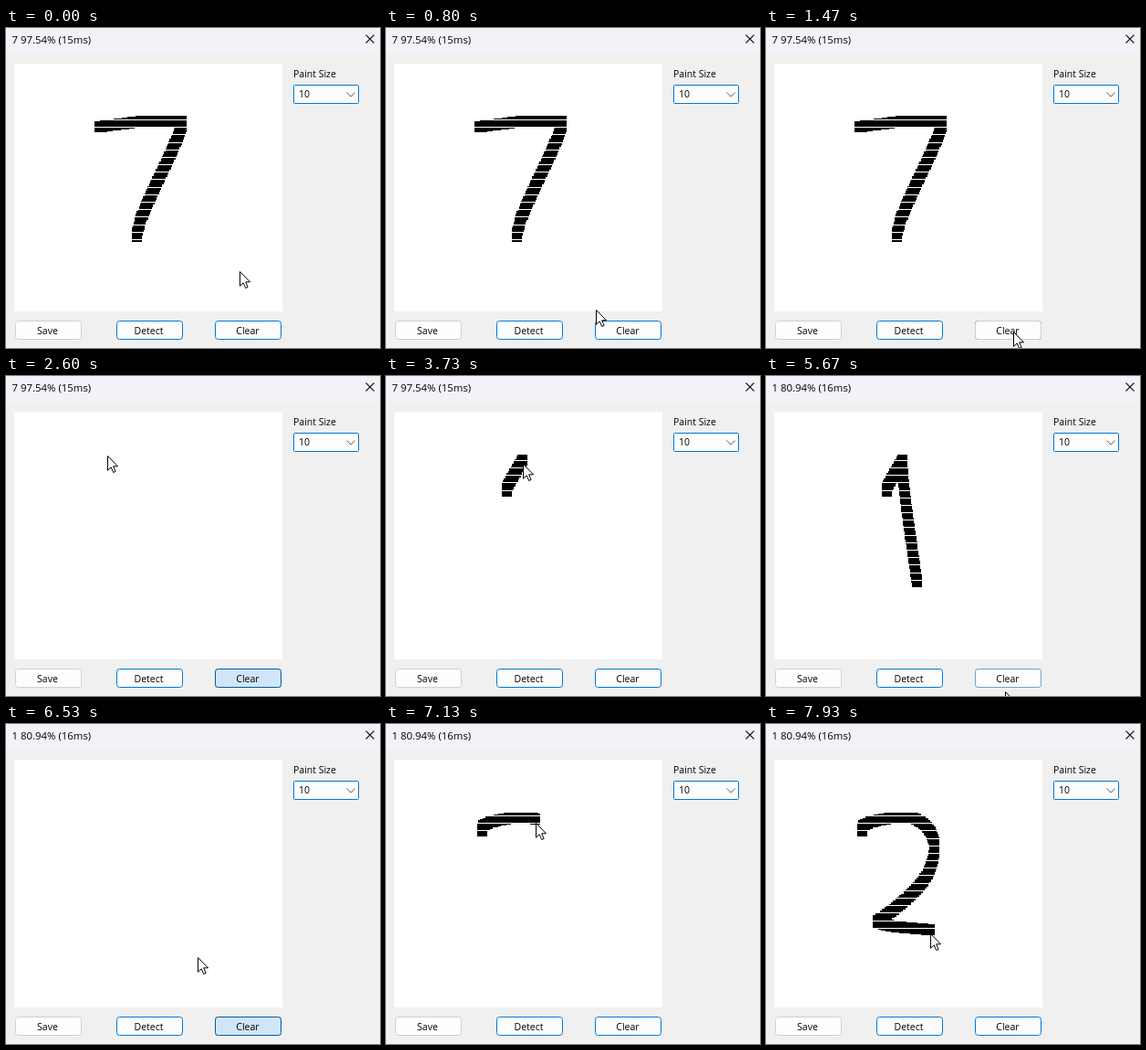
Recreate the animation shown at these times as an HTML page with a canvas. Size 410 by 350 pixels, loop 8 s.

```html
<!DOCTYPE html>
<html lang="en">
<head>
<meta charset="utf-8">
<title>Digit painter</title>
<style>
  html, body { margin: 0; width: 100%; height: 100%; overflow: hidden; background: #f0f0f0; }
  svg, canvas { position: absolute; left: 0; top: 0; }
  text { font: 500 10.5px "Open Sans", "Noto Sans", sans-serif; fill: #000; }
  .title { font-size: 11.4px; font-weight: 400; }
  .mid { text-anchor: middle; }
  .line { fill: none; stroke: #1a1a1a; }
  .btn { fill: #fdfdfd; stroke: #d0d0d0; }
  .blue { stroke: #0078d4; }
  .down { fill: #d0e6f8; stroke: #005a9e; }
</style>
</head>
<body>
<svg width="410" height="350">
  <rect width="410" height="28" fill="#f1f3f9"/>
  <text id="title" class="title" x="6.5" y="17"></text>
  <path class="line" stroke-width="1.1" d="M394.5 7.5l9 9m0-9l-9 9"/>
  <rect x="9" y="39" width="294" height="271" fill="#fff"/>
  <text x="315" y="54">Paint Size</text>
  <rect class="btn blue" x="315.5" y="62.5" width="71" height="20" rx="1"/>
  <text x="321" y="76">10</text>
  <path class="line" style="stroke:#666" d="M373.5 70.5l4.5 4.5l4.5-4.5"/>
  <rect class="btn" x="10.5" y="320.5" width="72" height="20" rx="3"/>
  <rect class="btn blue" x="121.5" y="320.5" width="72" height="20" rx="3"/>
  <rect class="btn blue" x="229.5" y="320.5" width="72" height="20" rx="3"/>
  <rect id="hover" class="btn" x="229.5" y="320.5" width="72" height="20" rx="3"/>
  <rect id="down" class="btn down" x="229.5" y="320.5" width="72" height="20" rx="3"/>
  <text class="mid" x="45.5" y="335">Save</text>
  <text class="mid" x="156.5" y="335">Detect</text>
  <text class="mid" x="265" y="335">Clear</text>
</svg>
<canvas id="ink" width="410" height="350"></canvas>
<svg width="410" height="350">
  <path id="cursor" fill="#fff" stroke="#000" stroke-linejoin="round"
    d="M.5.5V16.3L4.2 12.8L6.7 18.5L9.1 17.4L6.7 11.8H11.5Z"/>
</svg>
<script>
const LOOP = 8000, FPS = 15;
const $ = id => document.getElementById(id);
const ctx = $('ink').getContext('2d');
const clamp = v => Math.max(0, Math.min(1, v));

// A gesture runs along a path between two ticks; one with `clear` leaves ink until that tick.
function gesture(from, to, d, clear) {
  const path = document.createElementNS('http://www.w3.org/2000/svg', 'path');
  path.setAttribute('d', d);
  return { from, to, clear, path, length: path.getTotalLength() };
}

const gestures = [
  gesture(-9, -1, 'M102.5 108L150 102H192.5V108C180 145 144 205 143.5 228', 34),
  gesture(5, 18, 'M256 266C172 155 150 280 273 334'),
  gesture(20, 22, 'M273 334L271 332'),
  gesture(34, 39, 'M271 332L111 87'),
  gesture(42, 51, 'M111 87Q104 105 134 129'),
  gesture(52, 56, 'M132.5 126V121Q139 110 149.5 92', 97),
  gesture(56, 62, 'M149.5 92C150 120 156 160 165.5 225', 97),
  gesture(63, 69, 'M167 226L156 331'),
  gesture(79, 90, 'M156 331C230 345 300 355 268 332'),
  gesture(97, 102, 'M268 332L107 120'),
  gesture(103.2, 119, 'M105.5 117V112C118 103 142 102.5 158 103C172 103 184.5 122 184.5 130' +
    'C187 166 160 190 121.5 216C130 222 160 223 179.5 225', 120)
];

function pointAt(g, k) {
  const p = clamp((k - g.from) / (g.to - g.from));
  return g.path.getPointAtLength(g.length * (g.clear ? p : 1 - (1 - p) ** 2));
}

function stamp({ x, y }) {
  ctx.fillRect(Math.round(x - 5.5), Math.round(y - 6), 11, 12);
}

function paint(g, k) {
  const done = g.length * clamp((k - g.from) / (g.to - g.from));
  for (let s = 0; s < done; s += 3) stamp(g.path.getPointAtLength(s));
  stamp(pointAt(g, k));
}

// Opacity of a button state that fades in over n ticks.
const fade = (k, from, to, n) => k < from || k >= to ? 0 : clamp((k - from + 1) / n);

function draw(k) {
  ctx.clearRect(0, 0, 410, 350);
  ctx.fillStyle = '#000';
  for (const g of gestures) if (k >= g.from && k < g.clear) paint(g, k);
  ctx.fillStyle = '#fff';
  for (let y = 43; y < 310; y += 8.2) ctx.fillRect(9, Math.floor(y), 294, 1);

  const move = gestures.filter(g => g.from <= k && g.to > 0).pop() || gestures[1];
  const tip = pointAt(move, k), [dx, dy] = move.clear ? [1, 4] : [0, 0];
  $('cursor').setAttribute('transform',
    `translate(${Math.floor(tip.x + dx)} ${Math.floor(tip.y + dy)})`);

  $('hover').style.opacity = fade(k, 17, 43, 2) + fade(k, 85, 101, 2);
  $('down').style.opacity = fade(k, 32, 43, 2) + fade(k, 93, 101, 3);
  $('title').textContent = k < 72 ? '7 97.54% (15ms)' : '1 80.94% (16ms)';
}

let last = -1;
function tick() {
  const t = performance.now() % LOOP;
  const k = Math.min(119, Math.floor((t + 5) * FPS / 1000));
  if (k !== last) draw(last = k);
  requestAnimationFrame(tick);
}
tick();
</script>
</body>
</html>
```
